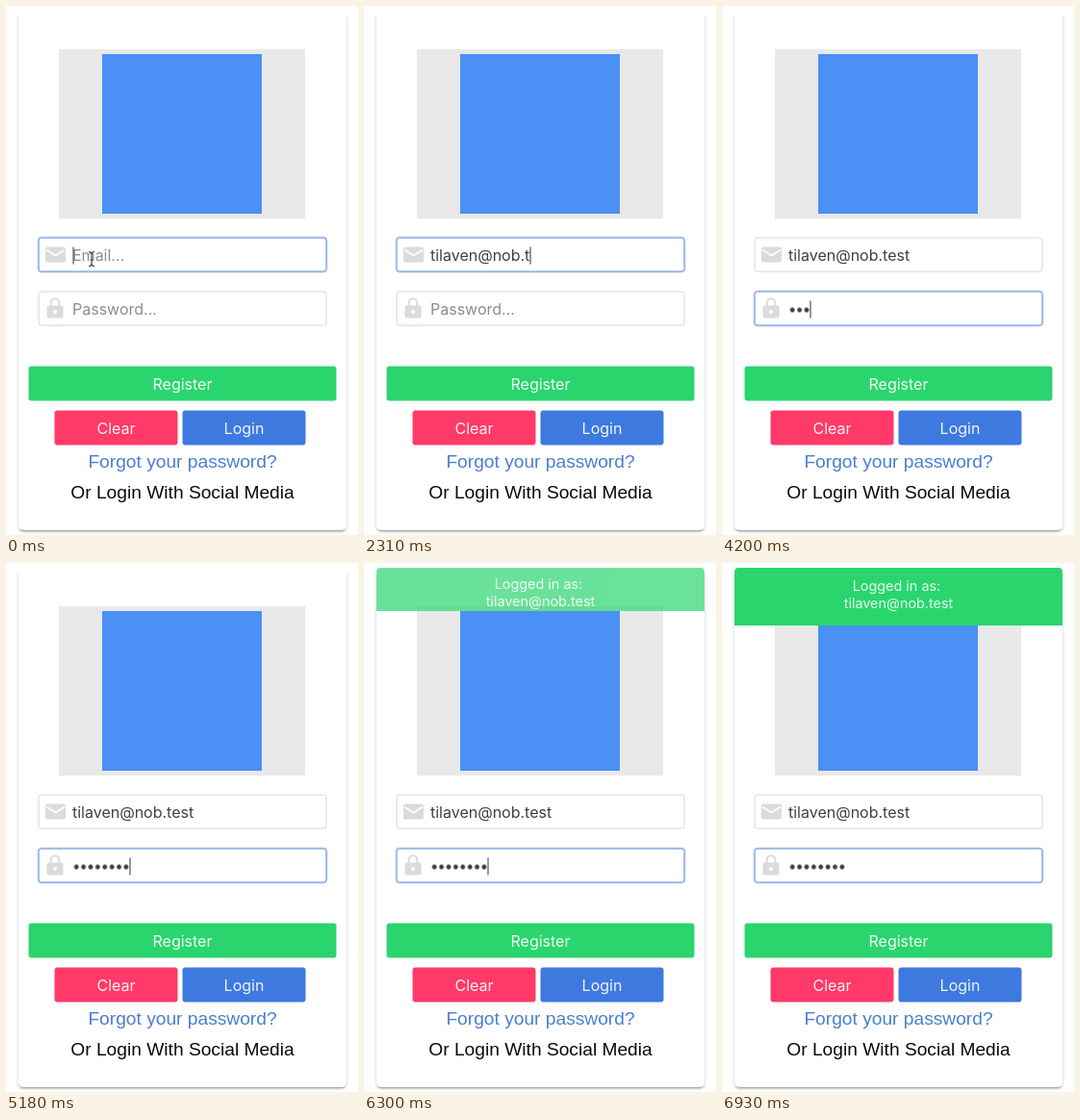
Write an HTML page that moves like this. It is 366 by 550 pixels and loops after 7000 ms.

```html
<!DOCTYPE html>
<html lang="en">
<head>
<meta charset="utf-8">
<title>Login form</title>
<style>
html, body { margin: 0; width: 100%; height: 100%; overflow: hidden; background: #fff; }
body { position: relative; font: 16px/37px Inter, sans-serif; }
div, svg, i { position: absolute; box-sizing: border-box; white-space: pre; }
.card { left: 13px; top: 5px; width: 341px; height: 540px; border-radius: 5px; clip-path: inset(6px -6px -8px);
  box-shadow: 0 2px 2px rgba(0,0,0,.14), 0 3px 1px -2px rgba(0,0,0,.2), 0 1px 5px rgba(0,0,0,.12); }
.picture { left: 55px; top: 45px; width: 256px; height: 176px; background: #e9e9e9; }
.mark { left: 45px; top: 5px; width: 166px; height: 166px; background: #4a90f5; }
/* The form sits on half pixels and is slightly soft. */
.form { left: 0; top: 0; width: 366px; height: 550px; transform: translate(.5px, .5px); filter: blur(.4px); }
.field { left: 33px; width: 300px; height: 36px; border: 1px solid #d6d6d6; border-radius: 3px; color: #404040; }
.field.focus { border-color: #5a8ad8; box-shadow: 0 0 2px #6f9ae0; }
.field svg { left: 5px; top: 4px; fill: #dbdbdb; }
.value { left: 34.5px; top: 0; height: 35px; line-height: 35px; }
.empty { color: #8c8c8c; }
.dots { background: radial-gradient(circle, #3c3c3c 2px, transparent 2.8px) 0 1px / 7.4px 35px repeat-x; }
.caret { top: 9px; width: 1px; height: 18px; background: #333; }
.button { height: 36px; border-radius: 3px; text-align: center; color: rgba(255,255,255,.92); }
.line { left: 0; width: 366px; text-align: center; font: 19.2px/22px "Liberation Sans", Arial, sans-serif; }
#spinner { left: 57px; top: 10px; width: 18px; height: 18px; border: 2px solid #eef3fc;
  border-top-color: transparent; border-right-color: transparent; border-radius: 50%; }
#notice { left: 13px; top: 5px; width: 341px; overflow: hidden; border-radius: 4px 4px 0 0;
  background: #2ad56e; color: rgba(255,255,255,.88); text-align: center; font-size: 14.4px; line-height: 18px; }
#message { left: 0; width: 100%; }
#pointer { left: 84px; top: 254px; fill: none; }
</style>
</head>
<body>
<div class="card"></div>
<div class="picture"><div class="mark"></div></div>

<div class="form">
  <div class="field" id="email" style="top:240px">
    <svg width="24" height="26"><path d="M3.5 5h17a2 2 0 0 1 2 2v12a2 2 0 0 1-2 2h-17a2 2 0 0 1-2-2V7a2 2 0 0 1 2-2z"/><path d="M2.5 8l9.5 6 9.5-6" fill="none" stroke="#fff" stroke-width="1.7"/></svg>
    <div class="value"></div><i class="caret"></i>
  </div>
  <div class="field" id="password" style="top:296px">
    <svg width="24" height="26"><path d="M5 10h13a2 2 0 0 1 2 2v9a2 2 0 0 1-2 2H5a2 2 0 0 1-2-2v-9a2 2 0 0 1 2-2z"/><path d="M7.2 11V7a4.3 4.3 0 0 1 8.6 0v4" fill="none" stroke="#dbdbdb" stroke-width="2"/><circle cx="11.5" cy="16.5" r="2" fill="#fff"/></svg>
    <div class="value"></div><i class="caret"></i>
  </div>

  <div class="button" style="left:23px;top:374px;width:320px;background:#2ad56e">Register</div>
  <div class="button" style="left:50px;top:420px;width:128px;background:#ff3a68">Clear</div>
  <div class="button" style="left:183px;top:420px;width:128px;background:#3d79df"><span id="login">Login</span><i id="spinner"></i></div>
  <div class="line" style="top:462px;color:#4a7fd0">Forgot your password?</div>
  <div class="line" style="top:494px;color:#0a0a0a">Or Login With Social Media</div>
</div>

<div id="notice"><div id="message"></div></div>
<svg id="pointer" width="10" height="18"><path d="M2 1.5q3 0 3 2.5v10q0 2.5-3 2.5M8 1.5q-3 0-3 2.5v10q0 2.5 3 2.5M3.5 10h3" stroke="#444" stroke-width="1.2"/></svg>

<script>
const LOOP = 7000, STEP = 70, DOT = 7.4, INDENT = 34.5;
const ADDRESS = "tilaven@nob.test";
const emailKeys = [70, 350, 560, 630, 1120, 1260, 1400, 1540, 1680, 1890, 2100, 2170, 2310, 2660, 2730, 3010];
const passKeys = [3710, 3920, 4130, 4340, 4480, 4830, 4970, 5110];
const TAB = 3360, SUBMIT = 5390, REPLY = 6160, SLIDE = 370;

const $ = id => document.getElementById(id);
const show = (el, on) => el.style.visibility = on ? "visible" : "hidden";
const typed = (keys, t) => keys.filter(k => k <= t).length;

function field(id, text, hint, focused, caretOn, dots = 0) {
  const box = $(id), value = box.querySelector(".value"), caret = box.querySelector(".caret");
  const empty = !text && !dots;
  box.classList.toggle("focus", focused);
  value.textContent = empty ? hint : text;
  value.classList.toggle("empty", empty);
  value.classList.toggle("dots", dots > 0);
  value.style.width = dots ? dots * DOT + "px" : "auto";
  caret.style.left = INDENT + (empty ? 0 : value.getBoundingClientRect().width) + "px";
  show(caret, focused && caretOn);
}

function draw(t) {
  const blinkOn = t < 5740 || (t >= 6240 && t < 6740);
  field("email", ADDRESS.slice(0, typed(emailKeys, t)), "Email...", t < TAB, true);
  field("password", "", "Password...", t >= TAB, blinkOn, typed(passKeys, t));
  show($("pointer"), t < emailKeys[0]);

  const loading = t >= SUBMIT && t <= REPLY;
  show($("login"), !loading);
  show($("spinner"), loading);
  $("spinner").style.transform = `rotate(${180 + (t - REPLY) * 360 / 500}deg)`;

  const p = Math.min(1, Math.max(0, (t - REPLY) / SLIDE));
  const open = 1 - (1 - p) ** 2.5;
  show($("notice"), p > 0);
  $("notice").style.opacity = open;
  $("notice").style.height = 12 + 48 * open + "px";
  $("message").style.top = 2 + 8 * open + "px";
}

$("message").textContent = "Logged in as:\u00a0\n" + ADDRESS;
const start = performance.now();
function tick() {
  const t = (performance.now() - start) % LOOP;
  draw(Math.floor(t / STEP) * STEP);
  requestAnimationFrame(tick);
}
tick();
</script>
</body>
</html>
```
